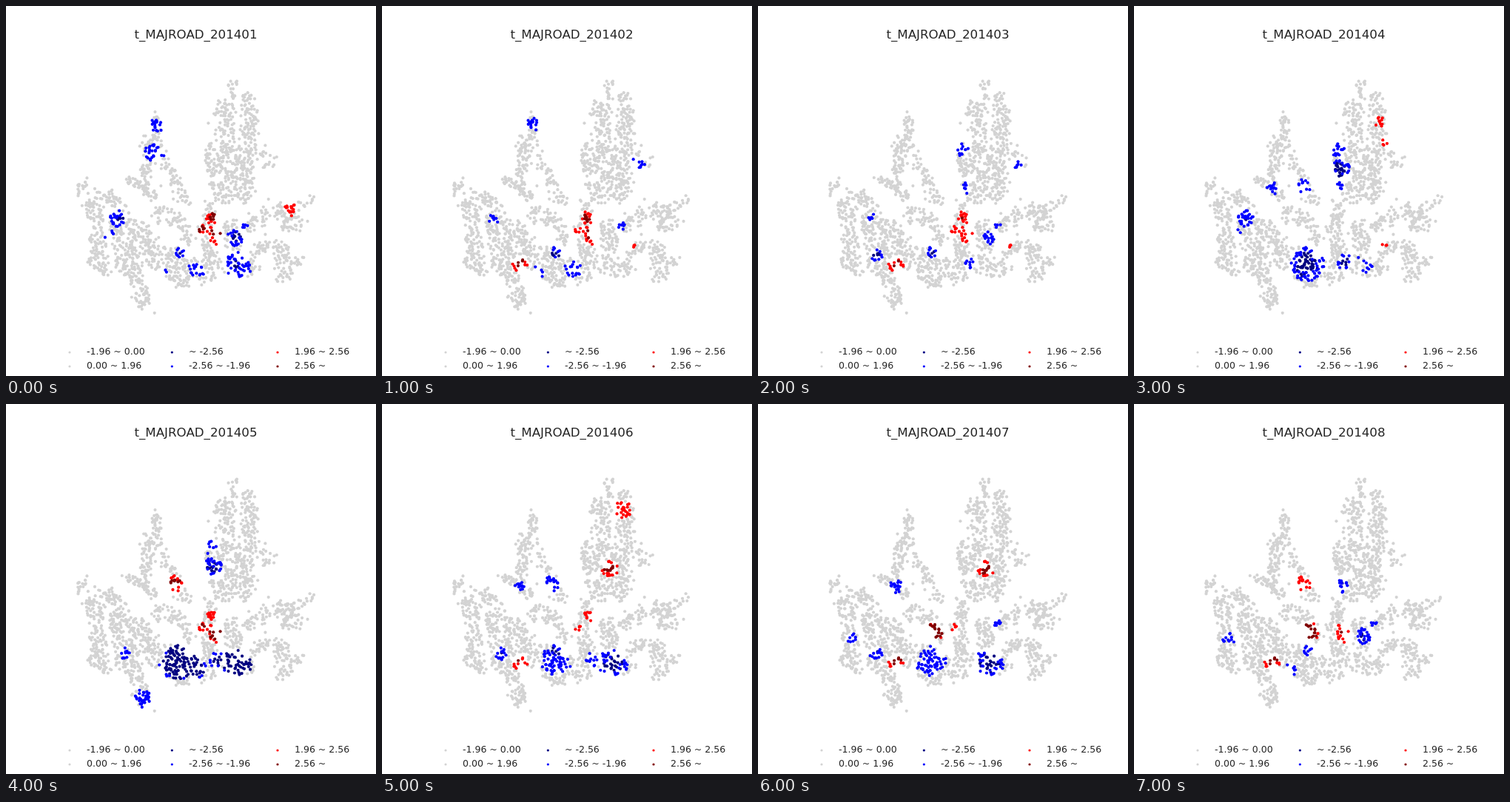
An HTML page with a canvas that plays this animation: 500x500 px, repeating every 8000 ms.

```html
<!DOCTYPE html>
<html lang="en">
<head>
<meta charset="utf-8">
<style>
html, body { margin: 0; width: 100%; height: 100%; overflow: hidden; background: #fff; }
canvas, svg { position: absolute; left: 0; top: 0; width: 500px; height: 500px; }
text { font: 12.5px "DejaVu Sans", sans-serif; fill: #262626; }
#title { font-size: 16.67px; text-anchor: middle; }
</style>
</head>
<body>
<canvas id="map"></canvas>
<svg viewBox="0 0 500 500">
  <text id="title" x="256.5" y="44">t_MAJROAD_201401</text>
  <g id="legend"></g>
</svg>
<script>
const GRAY = '#d3d3d3', NAVY = '#000080', BLUE = '#0000ff', RED = '#ff0000', DARK = '#800000';
const STEP = 1000;

// Built-up strips: x1, y1, x2, y2, half width
const north = [
  [308, 104, 309, 122, 6], [290, 140, 300, 142, 11], [328, 126, 328, 158, 9], [297, 160, 302, 200, 9],
  [325, 168, 330, 195, 9], [345, 203, 352, 212, 8], [280, 194, 284, 215, 11], [322, 200, 320, 250, 13],
  [300, 222, 296, 258, 11], [275, 190, 278, 245, 4],
  [203, 155, 205, 195, 6], [192, 187, 187, 240, 8], [216, 210, 242, 262, 5], [164, 233, 203, 257, 4]
];
const south = [
  [104, 242, 104, 251, 7], [130, 253, 158, 275, 7], [118, 270, 128, 340, 10], [155, 290, 165, 350, 15],
  [180, 300, 203, 345, 11], [116, 346, 134, 358, 6], [173, 355, 186, 400, 9],
  [206, 280, 230, 289, 10], [235, 288, 247, 314, 5], [227, 340, 234, 368, 14], [250, 352, 270, 362, 11],
  [290, 250, 268, 302, 7], [276, 315, 276, 345, 9], [303, 300, 310, 324, 10], [296, 347, 324, 354, 13],
  [325, 299, 352, 280, 7], [375, 278, 384, 294, 13], [390, 272, 416, 260, 5], [371, 328, 377, 362, 10],
  [377, 345, 398, 345, 5], [336, 335, 353, 322, 7]
];

// Neighbourhoods: x, y, reach
const sites = {
  tip: [324, 142, 14], brow: [332, 156, 7], ridge: [338, 182, 6], rise: [308, 223, 11], bend: [347, 214, 12],
  lane: [275, 194, 11], walk: [277, 222, 15], gate: [279, 246, 10],
  spire: [203, 160, 11], neck: [200, 198, 15], moor: [187, 247, 11], slope: [228, 244, 13], bank: [185, 271, 10],
  farm: [151, 287, 11], field: [138, 308, 9], shore: [127, 316, 11], mill: [160, 337, 9], yard: [186, 348, 11],
  foot: [186, 398, 14], port: [212, 360, 10], weir: [234, 334, 8], basin: [234, 349, 23], quay: [257, 357, 14],
  inlet: [238, 308, 12], bridge: [279, 286, 9], ford: [266, 302, 7], cross: [284, 309, 13],
  core: [310, 313, 11], corner: [323, 297, 6], dock: [286, 346, 11], plaza: [312, 350, 20],
  east: [384, 274, 10], glen: [361, 306, 7], ledge: [337, 322, 9]
};

// Peak z-score of each significant neighbourhood, by month
const jan = {
  spire: -2.3, neck: -2.4, farm: -2.7, field: -2.2, port: -2.2, weir: -2.6, quay: -2.3, core: -2.9, corner: -2.3,
  plaza: -2.5, bank: 2.3, east: 2.4, bridge: 2.7, ford: 2.9, cross: 2.7
};
const mar = {
  lane: -2.2, bend: -2.3, gate: -2.2, farm: -2.1, mill: -2.7, weir: -2.9, core: -2.3, corner: -2.3, dock: -2.3,
  yard: 2.7, bridge: 2.6, ford: 2.3, cross: 2.6, ledge: 2.1
};
const apr = {
  lane: -2.5, walk: -2.8, gate: -2.3, moor: -2.2, slope: -2.3, farm: -2.6, field: -2.2, weir: -2.9, basin: -2.8,
  dock: -2.8, plaza: -2, brow: 2.5, ridge: 2.4, ledge: 2.1
};
const may = {
  lane: -2.2, walk: -2.7, mill: -2.4, foot: -2.4, port: -2.7, basin: -3.4, quay: -3, dock: -3, plaza: -3.5,
  slope: 2.8, bridge: 2.4, ford: 2.8, cross: 3, glen: 2.3
};
const jun = {
  moor: -2.3, slope: -2.5, mill: -2.6, weir: -2.8, basin: -2.3, dock: -2.4, plaza: -2.8,
  tip: 2.4, rise: 2.7, bridge: 2.2, ford: 2.2, yard: 2.5
};
const aug = {
  gate: -2.6, corner: -2.3, core: -2.7, shore: -2.3, port: -2.3, weir: -2.4,
  slope: 2.4, inlet: 3.1, cross: 2.6, yard: 2.8
};

// Months in between share half of each neighbour's pattern.
const half = (m, k) => Object.entries(m).filter((_, i) => i % 2 === k);
const between = (a, b) => Object.fromEntries([...half(a, 0), ...half(b, 1)]);
const months = [jan, between(jan, mar), mar, apr, may, jun, between(jun, aug), aug];

function seeded(s) {
  return () => {
    s = (s + 0x6d2b79f5) | 0;
    let t = Math.imul(s ^ (s >>> 15), 1 | s);
    t = (t + Math.imul(t ^ (t >>> 7), 61 | t)) ^ t;
    return ((t ^ (t >>> 14)) >>> 0) / 4294967296;
  };
}

function outside([x1, y1, x2, y2, w], x, y) {
  const dx = x2 - x1, dy = y2 - y1;
  const t = Math.max(0, Math.min(1, ((x - x1) * dx + (y - y1) * dy) / (dx * dx + dy * dy)));
  return Math.hypot(x - x1 - dx * t, y - y1 - dy * t) - w;
}

// Random throws stay where they hit a strip, thinning out past its edge.
function settle(throws) {
  const rnd = seeded(11), strips = [...north, ...south], homes = [];
  for (let i = 0; i < throws; i++) {
    const x = 97 + rnd() * 322, y = 101 + rnd() * 315;
    const gap = Math.min(...strips.map(s => outside(s, x, y)));
    if (rnd() < (gap < 0 ? 1 : 0.45 * Math.exp(-gap / 2.5))) homes.push([x, y]);
  }
  return homes;
}

function score(month, x, y) {
  let best = 0;
  for (const name in month) {
    const [sx, sy, reach] = sites[name];
    const d = Math.hypot(x - sx, y - sy) / reach;
    const z = month[name] * (1 - 0.25 * d * d);
    if (d < 1 && Math.abs(z) > Math.abs(best)) best = z;
  }
  return best;
}

const colorOf = z =>
  z <= -2.56 ? NAVY : z <= -1.96 ? BLUE : z < 1.96 ? GRAY : z < 2.56 ? RED : DARK;

const homes = settle(7400);
const canvas = document.getElementById('map');
const title = document.getElementById('title');
const ctx = canvas.getContext('2d');
const scale = window.devicePixelRatio || 1;
canvas.width = canvas.height = 500 * scale;
ctx.scale(scale, scale);

function draw(m) {
  const rnd = seeded(97 * (m + 1));
  const layers = { [GRAY]: [], [NAVY]: [], [BLUE]: [], [RED]: [], [DARK]: [] };
  for (const [x, y] of homes) {
    const sold = rnd() < 0.88, noise = (rnd() - 0.5) * 0.4;
    if (sold) layers[colorOf(score(months[m], x, y) + noise)].push([x, y]);
  }
  ctx.clearRect(0, 0, 500, 500);
  for (const color in layers) {
    ctx.fillStyle = color;
    for (const [x, y] of layers[color]) {
      ctx.beginPath();
      ctx.arc(x, y, 2.1, 0, 2 * Math.PI);
      ctx.fill();
    }
  }
  title.textContent = 't_MAJROAD_20140' + (m + 1);
}

const entries = [
  ['-1.96 ~ 0.00', GRAY], ['0.00 ~ 1.96', GRAY], ['~ -2.56', NAVY],
  ['-2.56 ~ -1.96', BLUE], ['1.96 ~ 2.56', RED], ['2.56 ~', DARK]
];
const columns = [[86, 109], [224.3, 247], [367, 390]];
document.getElementById('legend').innerHTML = entries.map(([label, color], i) => {
  const [cx, x] = columns[i >> 1], y = 471 + (i % 2) * 19;
  return `<circle cx="${cx}" cy="${y - 3}" r="1.6" fill="${color}"/><text x="${x}" y="${y}">${label}</text>`;
}).join('');

let shown = -1;
const start = performance.now();
function tick() {
  const m = Math.floor((performance.now() - start) / STEP) % months.length;
  if (m !== shown) draw(shown = m);
  requestAnimationFrame(tick);
}
tick();
</script>
</body>
</html>
```
